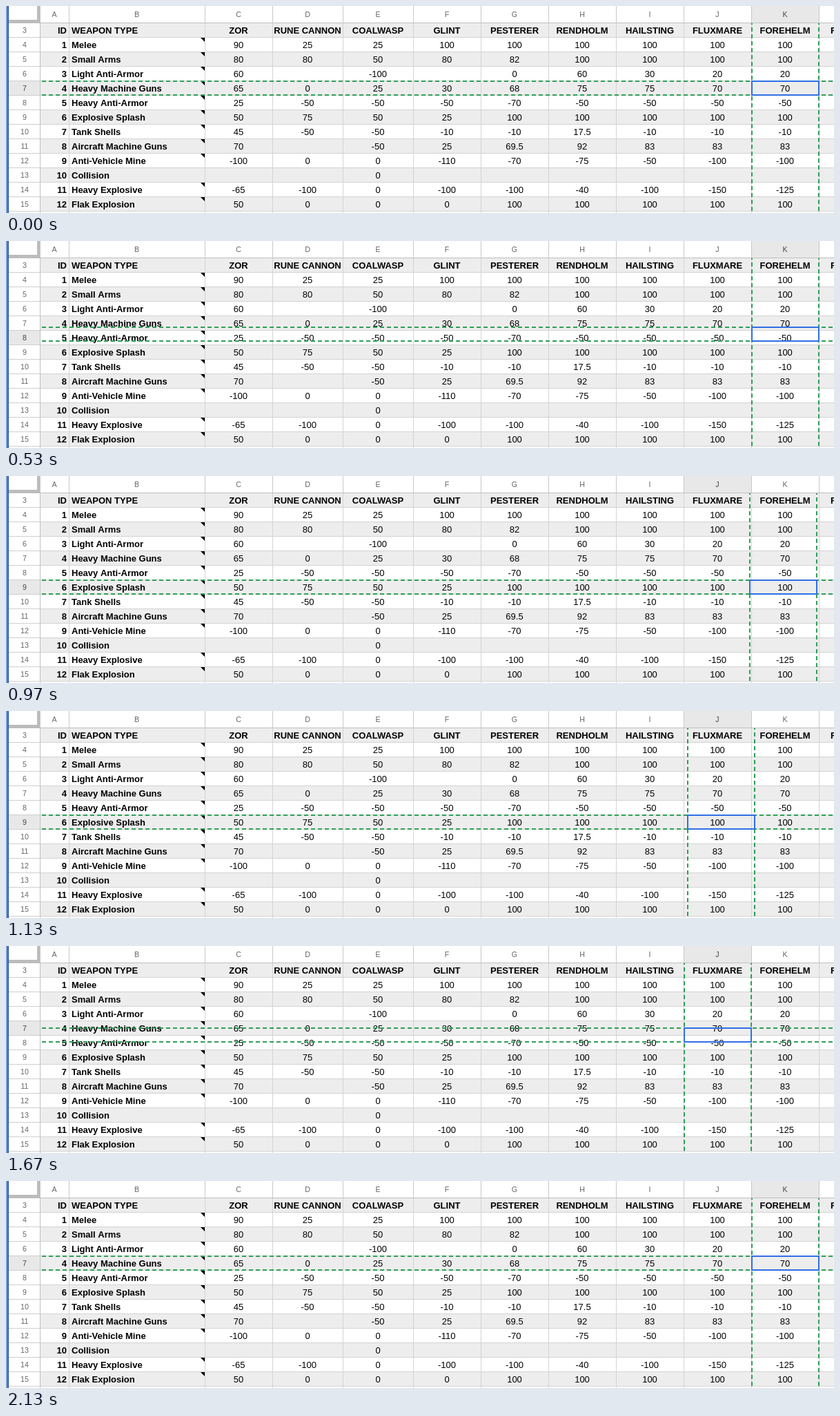
Recreate the animation shown at these times as an HTML page with a canvas. Size 1200x300 px, loop 2.2 s.

```html
<!DOCTYPE html>
<html lang="en">
<head>
<meta charset="utf-8">
<title>Weapon table</title>
<style>
  html, body { margin: 0; width: 100%; height: 100%; overflow: hidden; background: #fff; }
  canvas { display: block; width: 1200px; height: 300px; }
</style>
</head>
<body>
<canvas id="stage" width="1200" height="300"></canvas>
<script>
const ctx = document.getElementById('stage').getContext('2d');
const W = 1200, H = 300, LOOP = 2200;
const HEAD_W = 49, HEAD_H = 24, ROW_H = 21, FIRST_ROW = 3;
const FONT = '"Liberation Sans", Arial, sans-serif';

// Grid line to the left of each column, A to L
const edges = [49, 91, 288, 386, 488, 590, 688, 786, 884, 982, 1080, 1178, 1276];
const letters = 'ABCDEFGHIJK';
const titles = ['ZOR', 'RUNE CANNON', 'COALWASP', 'GLINT', 'PESTERER',
  'RENDHOLM', 'HAILSTING', 'FLUXMARE', 'FOREHELM'];

const weapons = [
  ['Melee', '90 25 25 100 100 100 100 100 100'],
  ['Small Arms', '80 80 50 80 82 100 100 100 100'],
  ['Light Anti-Armor', '60 _ -100 _ 0 60 30 20 20'],
  ['Heavy Machine Guns', '65 0 25 30 68 75 75 70 70'],
  ['Heavy Anti-Armor', '25 -50 -50 -50 -70 -50 -50 -50 -50'],
  ['Explosive Splash', '50 75 50 25 100 100 100 100 100'],
  ['Tank Shells', '45 -50 -50 -10 -10 17.5 -10 -10 -10'],
  ['Aircraft Machine Guns', '70 _ -50 25 69.5 92 83 83 83'],
  ['Anti-Vehicle Mine', '-100 0 0 -110 -70 -75 -50 -100 -100'],
  ['Collision', '_ _ 0'],
  ['Heavy Explosive', '-65 -100 0 -100 -100 -40 -100 -150 -125'],
  ['Flak Explosion', '50 0 0 0 100 100 100 100 100']
];

// Selection path: start time, column index, row number
const J = 9, K = 10, MOVE_MS = 240;
const moves = [
  { at: -LOOP, col: K, row: 7 },
  { at: 422, col: K, row: 8 },
  { at: 695, col: K, row: 9 },
  { at: 960, col: J, row: 9 },
  { at: 1312, col: J, row: 8 },
  { at: 1599, col: J, row: 7 },
  { at: 1906, col: K, row: 7 }
];

const rowTop = row => HEAD_H + (row - FIRST_ROW) * ROW_H;
const lerp = (a, b, p) => Math.round(a + (b - a) * p);

// CSS "ease": cubic-bezier(.25, .1, .25, 1)
function ease(x) {
  if (x >= 1) return 1;
  const curve = (a, b, s) => 3 * a * s * (1 - s) ** 2 + 3 * b * s * s * (1 - s) + s ** 3;
  let lo = 0, hi = 1;
  for (let i = 0; i < 24; i++) {
    const mid = (lo + hi) / 2;
    if (curve(0.25, 0.25, mid) < x) lo = mid; else hi = mid;
  }
  return curve(0.1, 1, lo);
}

function rect(x, y, w, h, color) {
  ctx.fillStyle = color;
  ctx.fillRect(x, y, w, h);
}

function text(str, x, y, align, font, color) {
  ctx.font = font + ' ' + FONT;
  ctx.textAlign = align;
  ctx.fillStyle = color;
  ctx.fillText(str, x, y);
}

const bold = (str, x, y, align) => text(str, x, y, align, 'bold 13px', '#000');
const plain = (str, x, y) => text(str, x, y, 'center', '13px', '#000');
const label = (str, x, y, on) =>
  text(str, x, y, 'center', '10.67px', on ? '#444' : '#666');
const center = col => (edges[col] + edges[col + 1]) / 2;

function drawGrid() {
  rect(0, 0, W, H, '#fff');
  for (let row = FIRST_ROW; row <= 16; row++) {
    const y = rowTop(row);
    if (row % 2) rect(HEAD_W, y + 1, W, ROW_H, '#ededed');
    rect(HEAD_W, y + ROW_H, W, 1, '#d3d3d3');
  }
  for (const x of edges.slice(1)) rect(x, HEAD_H, 1, H, '#d3d3d3');
}

function drawHeaders(active) {
  rect(0, 0, W, HEAD_H, '#fff');
  rect(edges[active.col] + 1, 0, edges[active.col + 1] - edges[active.col] - 1, HEAD_H, '#e8e8e8');
  rect(4, rowTop(active.row) + 1, HEAD_W - 4, ROW_H - 1, '#e8e8e8');
  for (const x of edges) rect(x, 0, 1, HEAD_H, '#c8c8c8');
  rect(HEAD_W, HEAD_H, W, 1, '#c0c0c0');
  rect(HEAD_W, HEAD_H, 1, H, '#c0c0c0');
  [...letters].forEach((ch, i) => label(ch, center(i), 16, i === active.col));
  for (let row = FIRST_ROW; row <= 15; row++) {
    const y = rowTop(row);
    rect(4, y + ROW_H, HEAD_W - 4, 1, '#cfcfcf');
    label(row, 27, y + 15, row === active.row);
  }
  rect(45, 0, 4, 25, '#bcbcbc');
  rect(4, 20, 45, 5, '#bcbcbc');
  rect(0, 0, 2, H, '#6f9bd8');
  rect(2, 0, 2, H, '#3f5f8f');
}

function noteMark(y) {
  ctx.fillStyle = '#000';
  ctx.beginPath();
  ctx.moveTo(282, y);
  ctx.lineTo(288, y);
  ctx.lineTo(288, y + 6);
  ctx.fill();
}

function drawCells() {
  bold('ID', 88, 40, 'right');
  bold('WEAPON TYPE', 95, 40, 'left');
  titles.forEach((title, i) => bold(title, center(i + 2), 40, 'center'));
  bold('F', 1195, 40, 'left');
  weapons.forEach(([name, values], i) => {
    const top = rowTop(i + 4), y = top + 16;
    bold(i + 1, 88, y, 'right');
    bold(name, 95, y, 'left');
    if (name !== 'Collision') noteMark(top + 1);
    values.split(' ').forEach((v, c) => {
      if (v !== '_') plain(v, center(c + 2), y);
    });
  });
}

function dashed(x1, y1, x2, y2) {
  ctx.beginPath();
  ctx.moveTo(x1, y1);
  ctx.lineTo(x2, y2);
  ctx.stroke();
}

function drawSelection({ left, right, top, bottom }) {
  ctx.lineWidth = 2;
  ctx.save();
  ctx.beginPath();
  ctx.rect(50, 25, W, H);
  ctx.clip();
  ctx.strokeStyle = '#2f9e58';
  ctx.setLineDash([6, 4]);
  for (const y of [top + 1, bottom]) dashed(52, y, W, y);
  for (const x of [left + 1, right]) dashed(x, 21, x, H);
  ctx.restore();
  ctx.strokeStyle = '#2f6fe4';
  ctx.strokeRect(left + 1, top + 1, right - left - 1, bottom - top - 1);
}

function selectionAt(t) {
  const n = moves.filter(m => m.at <= t).length - 1;
  const to = moves[n], from = moves[n - 1] || to;
  const p = ease((t - to.at) / MOVE_MS);
  const left = lerp(edges[from.col], edges[to.col], p);
  const top = lerp(rowTop(from.row), rowTop(to.row), p);
  return { to, left, right: left + 98, top, bottom: top + ROW_H };
}

function draw(now) {
  const sel = selectionAt(now % LOOP);
  drawGrid();
  drawHeaders(sel.to);
  drawCells();
  drawSelection(sel);
}

const start = performance.now();
function tick() {
  draw(performance.now() - start);
  requestAnimationFrame(tick);
}
tick();
</script>
</body>
</html>
```
